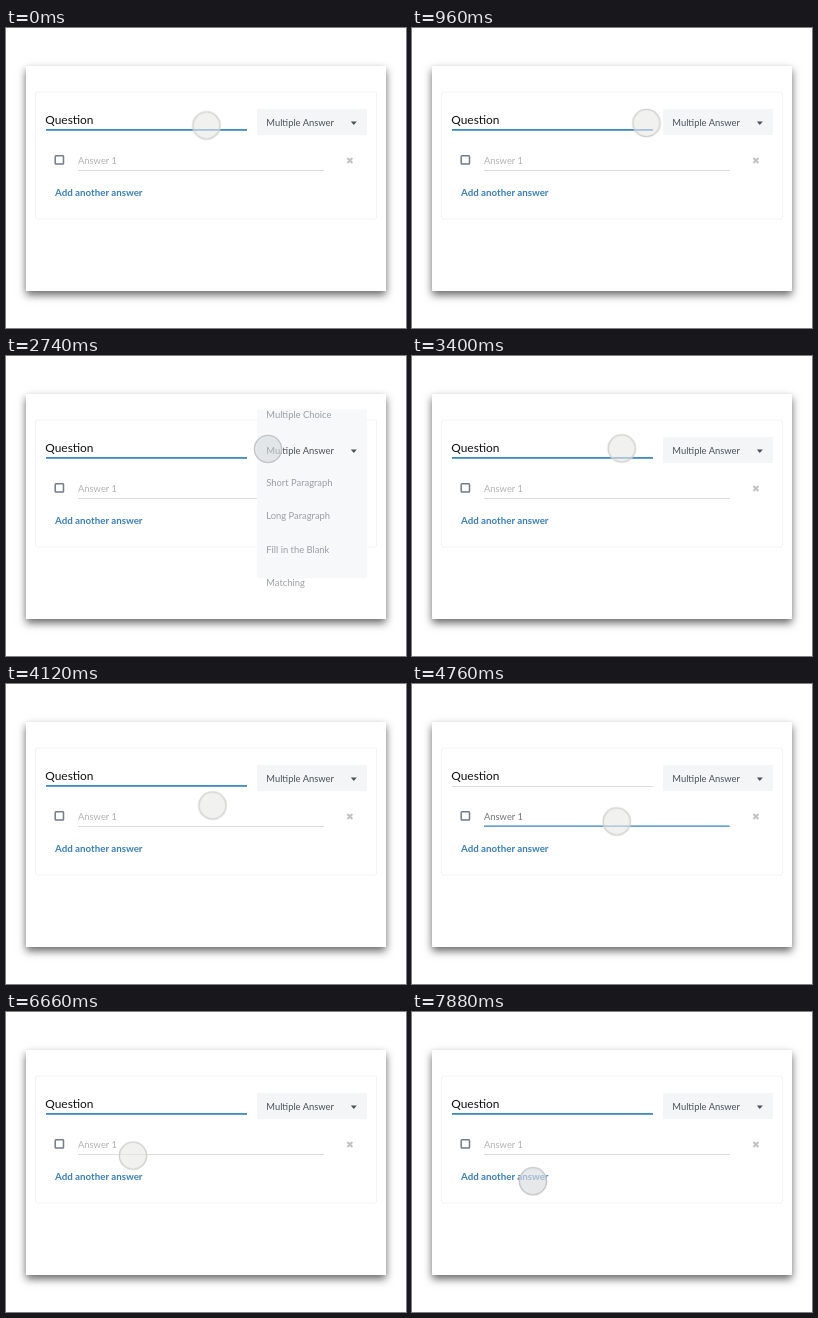
Recreate the animation shown at these times as an HTML page. Size 400x300 px, loop 8000 ms.

```html
<!DOCTYPE html>
<html lang="en">
<head>
<meta charset="utf-8">
<title>Question editor</title>
<style>
  html, body { margin: 0; width: 100%; height: 100%; overflow: hidden; background: #fff; }
  .window {
    position: absolute; left: 20px; top: 38px; width: 360px; height: 225px;
    background: #fff; box-shadow: 0 4px 8px rgba(0, 0, 0, .6);
  }
  svg { position: absolute; left: 0; top: 0; }
  text { font: 9.4px Lato, "Open Sans", sans-serif; fill: #4a525b; }
  #question { font-size: 11.9px; fill: #111; }
  #add { font-size: 9.75px; font-weight: 700; fill: #3a7fb8; }
  #answer { fill: #b2b2b2; }
  .rule { stroke: #dcdcdc; stroke-width: 1; }
  .focus { stroke: #3f8cc4; stroke-width: 1.7; }
  #options text { fill: #7d848b; }
  #options { opacity: 0; }
  #answerFocus { opacity: 0; }
  #menu { x: 251px; y: 81px; width: 110px; height: 26px; fill: #f3f5f7; }
  #disc { fill: rgba(232, 232, 229, .6); stroke: #cfcfcd; stroke-width: 1.4; }
</style>
</head>
<body>
<div class="window"></div>
<svg width="400" height="300" viewBox="0 0 400 300">
  <rect x="29.5" y="64" width="341" height="127" rx="2" fill="#fff" stroke="#f2f2f2"/>
  <text id="question" x="39.3" y="95.5">Question</text>
  <path class="rule" d="M40 102.5H241"/>
  <path id="questionFocus" class="focus" d="M40 101.8H241"/>

  <rect x="49.2" y="127.7" width="8.3" height="8.3" rx=".8" fill="none" stroke="#727b86" stroke-width="1.5"/>
  <text id="answer" x="72" y="135.7">Answer 1</text>
  <path class="rule" d="M72 142.5H318"/>
  <path id="answerFocus" class="focus" d="M72 142.2H317.5"/>
  <path d="M341.4 129.9l5 5m0-5l-5 5" stroke="#c2c2c2" stroke-width="2.1"/>
  <text id="add" x="49" y="168.2">Add another answer</text>

  <rect id="menu" rx="1"/>
  <g id="options"></g>
  <text x="260.3" y="98.2">Multiple Answer</text>
  <path d="M344.8 93.6h6l-3 3.4z" fill="#4a525b"/>

  <g id="cursor"><circle id="disc" r="13.6"/></g>
</svg>
<script>
const LOOP = 8000;
const byId = id => document.getElementById(id);

const options = [["Multiple Choice", 59], ["Short Paragraph", 127], ["Long Paragraph", 160],
                 ["Fill in the Blank", 194], ["Matching", 227]];
for (const [label, y] of options) {
  const text = document.createElementNS("http://www.w3.org/2000/svg", "text");
  text.setAttribute("x", 260.3);
  text.setAttribute("y", y + 3.4);
  text.textContent = label;
  byId("options").append(text);
}

// Each step: [time in ms, style, easing towards the next step]
function play(id, steps) {
  const first = steps[0], last = steps[steps.length - 1];
  const all = [[0, first[1]], ...steps, [LOOP, last[1]]];
  byId(id).animate(
    all.map(([time, style, easing = "linear"]) => ({ ...style, offset: time / LOOP, easing })),
    { duration: LOOP, iterations: Infinity });
}

const at = (x, y) => ({ transform: `translate(${x}px, ${y}px)` });
const fade = opacity => ({ opacity });
const SMOOTH = "cubic-bezier(.42, 0, .3, 1)";
const OUT = "cubic-bezier(.2, .6, .4, 1)";

play("cursor", [
  [760, at(200.5, 97.5), SMOOTH],
  [1240, at(262, 93)],
  [2880, at(262, 93), SMOOTH],
  [3400, at(209.7, 92.5)],
  [3740, at(209.7, 92.5), SMOOTH],
  [4560, at(204.7, 137.5)],
  [4960, at(204.7, 137.5), "cubic-bezier(.45, 0, .7, .8)"],
  [5400, at(165, 105.5)],
  [5500, at(161, 100), "cubic-bezier(.25, .5, .5, 1)"],
  [5760, at(157, 94)],
  [6260, at(157, 94), "cubic-bezier(.5, 0, .7, .7)"],
  [6660, at(127, 143.5)],
  [6750, at(124, 155), "cubic-bezier(.2, .6, .5, 1)"],
  [7020, at(121, 169.3)]
]);

const idle = { fill: "rgba(232, 232, 229, .6)", stroke: "#cfcfcd" };
const pressed = { fill: "rgba(216, 219, 222, .65)", stroke: "#c2c5c7" };
const press = (from, to) => [[from, idle, "step-end"], [from, pressed, "step-end"],
                             [to, pressed, "step-end"], [to, idle, "step-end"]];
play("disc", [
  ...press(1400, 1640), ...press(2720, 2880), ...press(4600, 4740), ...press(5940, 6100),
  [7880, idle, "step-end"], [7880, pressed, "step-end"]
]);

const closed = { y: "81px", height: "26px", fill: "#f3f5f7" };
const open = { y: "47px", height: "202px", fill: "#f8f9fa" };
play("menu", [[1540, closed, OUT], [1860, open], [2720, open, OUT], [3040, closed]]);
play("options", [[1540, fade(0), OUT], [1880, fade(1)], [2720, fade(1), OUT], [2980, fade(0)]]);

play("questionFocus", [[4600, fade(1)], [4740, fade(0)], [5940, fade(0)], [6180, fade(1)]]);
play("answerFocus", [[4600, fade(0)], [4820, fade(1)], [5940, fade(1)], [6160, fade(0)]]);
const hint = { fill: "#b2b2b2" }, typed = { fill: "#4a4f55" };
play("answer", [[4600, hint], [4860, typed], [5940, typed], [6180, hint]]);
</script>
</body>
</html>
```
